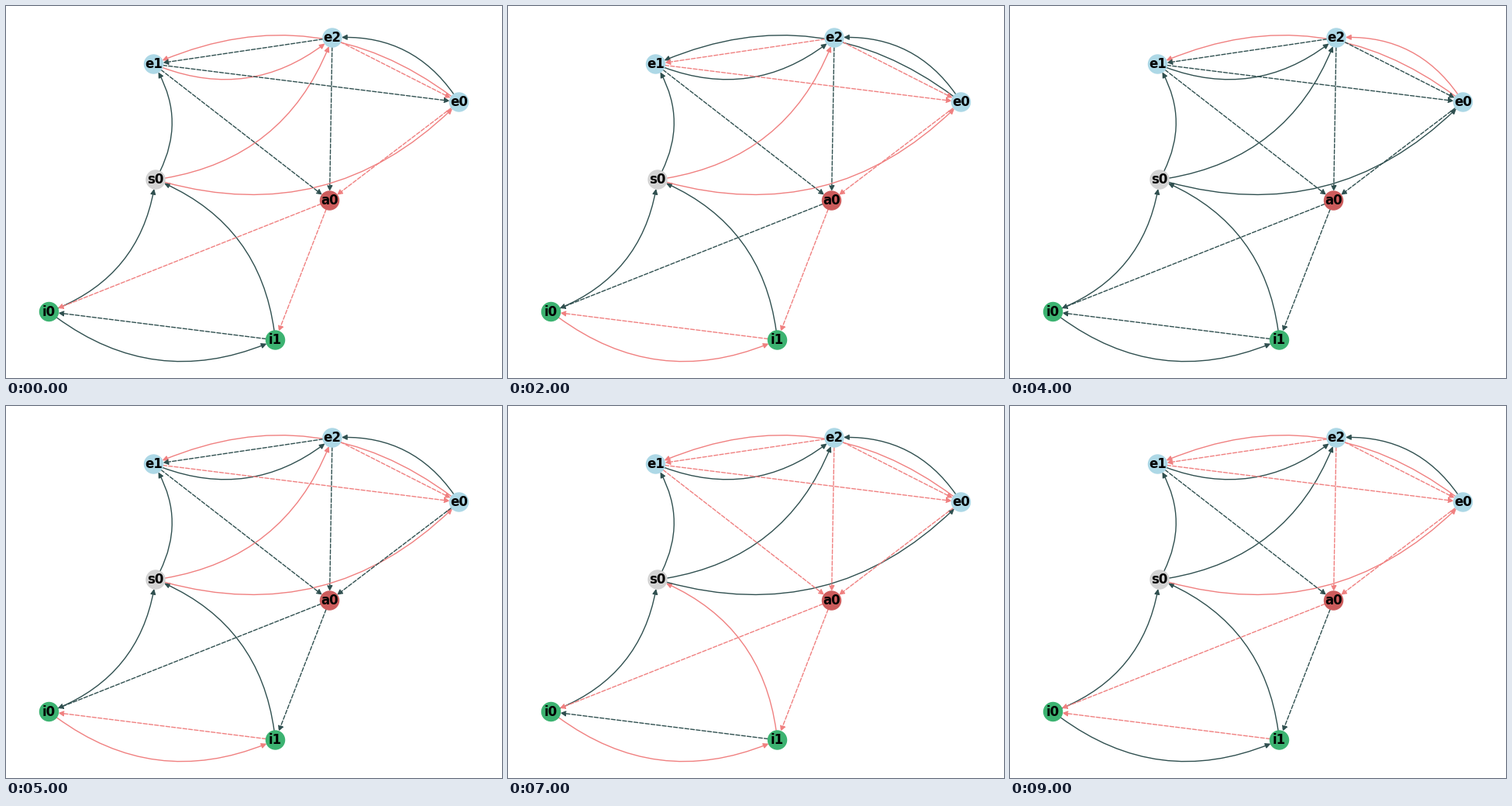
Write a matplotlib script that moves like this. It is 640 px wide and 480 px high and loops after 10000 ms.

```python
import matplotlib.pyplot as plt
from matplotlib.animation import FuncAnimation
from matplotlib.patches import FancyArrowPatch

W, H, DPI = 640, 480, 100
STEPS, STEP_MS = 10, 1000
ON, OFF = "darkslategrey", "lightcoral"
NODE_SIZE = 300

NODES = {
    "s0": (193, 224, "lightgrey"),
    "e0": (584.5, 124, "lightblue"),
    "e1": (190.5, 75, "lightblue"),
    "e2": (421, 41, "lightblue"),
    "a0": (417.5, 251, "indianred"),
    "i0": (55.5, 394.5, "mediumseagreen"),
    "i1": (347.5, 431, "mediumseagreen"),
}

# Each edge: start, end, and its on/off state for every step of the loop.
CURVED = [
    ("i0", "s0", "1011110111"),
    ("i1", "s0", "1110111001"),
    ("i0", "i1", "1000100001"),
    ("s0", "e0", "0000100100"),
    ("s0", "e1", "1011110111"),
    ("s0", "e2", "0000100111"),
    ("e1", "e2", "0110110111"),
    ("e0", "e2", "1111010111"),
    ("e0", "e1", "0011001010"),
]
DASHED = [
    ("e2", "e1", "1001110000"),
    ("e1", "e0", "1001100000"),
    ("e2", "e0", "0001100000"),
    ("e1", "a0", "1010111011"),
    ("e2", "a0", "1111110000"),
    ("e0", "a0", "0001111000"),
    ("a0", "i0", "0011111000"),
    ("a0", "i1", "0000111001"),
    ("i1", "i0", "1000100110"),
]

fig = plt.figure(figsize=(W / DPI, H / DPI), dpi=DPI, facecolor="white")
ax = fig.add_axes([0, 0, 1, 1])
ax.set_xlim(0, W)
ax.set_ylim(H, 0)
ax.axis("off")


def add_edge(start, end, rad, style):
    shrink = NODE_SIZE ** 0.5 / 2
    arrow = FancyArrowPatch(
        NODES[start][:2], NODES[end][:2], arrowstyle="-|>",
        connectionstyle=f"arc3,rad={rad}", mutation_scale=10,
        shrinkA=shrink, shrinkB=shrink, linewidth=1,
        linestyle=style, color=OFF, zorder=1)
    return ax.add_patch(arrow)


edges = [(add_edge(a, b, 0.3, "solid"), s) for a, b, s in CURVED]
edges += [(add_edge(a, b, 0, "dashed"), s) for a, b, s in DASHED]

xs, ys, colors = zip(*NODES.values())
ax.scatter(xs, ys, s=NODE_SIZE, c=colors, zorder=2)
for name, (x, y, _) in NODES.items():
    ax.text(x, y, name, size=12, weight="bold", family="DejaVu Sans",
            ha="center", va="center", zorder=3)


def update(step):
    for arrow, states in edges:
        arrow.set_color(ON if states[step] == "1" else OFF)
    return [arrow for arrow, _ in edges]


anim = FuncAnimation(fig, update, frames=STEPS, interval=STEP_MS,
                     repeat=True, repeat_delay=0)
plt.show()
```
